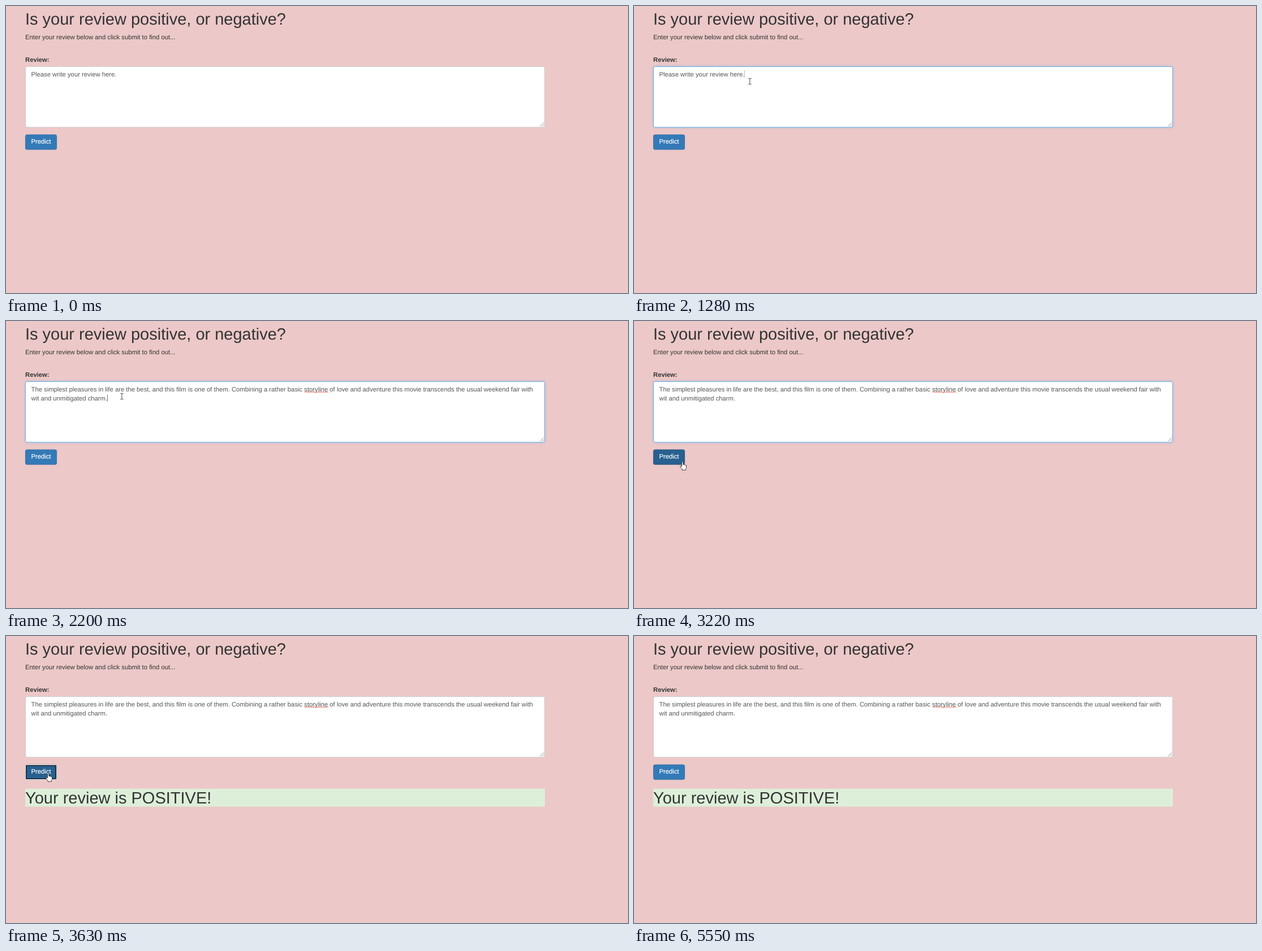
An HTML page for the animation above (5720 ms loop, 1100 px wide and 509 px high).

```html
<!DOCTYPE html>
<html lang="en">
<head>
<meta charset="utf-8">
<title>Review predictor</title>
<style>
  html, body { margin: 0; width: 100%; height: 100%; overflow: hidden; background: #ecc8c8; }
  svg { display: block; width: 1100px; height: 509px; }
  text {
    font: 11.285px "Liberation Sans", Arial, sans-serif;
    fill: #333;
    text-rendering: geometricPrecision;
  }
  .big { font-size: 29px; }
  .bold { font-weight: bold; }
  .field { fill: #555; }
  .light { fill: #fff; stroke: #fff; stroke-width: .2px; }
</style>
</head>
<body>
<svg viewBox="0 0 1100 509">
  <defs>
    <filter id="blur" x="-5%" y="-20%" width="110%" height="140%">
      <feGaussianBlur stdDeviation="2"/>
    </filter>
  </defs>

  <text class="big" x="34" y="33">Is your review positive, or negative?</text>
  <text x="34" y="58.8">Enter your review below and click submit to find out...</text>
  <text class="bold" x="34" y="98.7">Review:</text>

  <rect id="glow" x="34" y="107" width="919" height="108.4" rx="3.2" fill="#66afe9" filter="url(#blur)"/>
  <rect id="box" x="34.45" y="107.5" width="918.1" height="107.5" rx="2.9" fill="#fff"/>
  <path d="M944.6 213.4L951.2 206.8M948.4 213.4L951.2 210.6" stroke="#777" stroke-width=".8"/>

  <rect id="selection" x="44.5" y="114.2" width="151" height="12.8" fill="#3390ff"/>
  <text id="hint" class="field" x="44.5" y="124.5">Please write your review here.</text>
  <g id="review">
    <text class="field" x="44.5" y="124.5">The simplest pleasures in life are the best, and this film is one of them. Combining a rather basic storyline of love and adventure this movie transcends the usual weekend fair with</text>
    <text class="field" x="44.5" y="140.6">wit and unmitigated charm.</text>
    <path id="squiggle" fill="none" stroke="#e0452f" stroke-width=".9"/>
  </g>
  <rect id="caret" width=".8" height="12.6" fill="#555"/>

  <rect id="button" x="34.4" y="228.2" width="55.2" height="26.4" rx="2.9" stroke-width=".8"/>
  <g id="ring" fill="none">
    <rect x="34.5" y="228.5" width="54.8" height="26" rx="2.6" stroke="#fff"/>
    <rect x="35.6" y="229.6" width="52.6" height="23.8" rx="1.8" stroke="#101010" stroke-width="1.3"/>
  </g>
  <text class="light" x="44.4" y="244.4">Predict</text>

  <g id="result">
    <rect x="34" y="270.8" width="919" height="31.8" fill="#ddefd9"/>
    <text class="big" x="34" y="296.8">Your review is POSITIVE!</text>
  </g>

  <g id="pointer" stroke-width=".8" stroke-linejoin="round">
    <path id="arrow" fill="#fff" stroke="#111" d="M0 0V13.2L3 10.4 5 15 7 14.1 5 9.7H9.2Z"/>
    <path id="beam" fill="none" stroke="#333" stroke-width=".9"
      d="M-2.7 -5.2H-.7L0 -4.6 .7 -5.2H2.7M0 -4.6V4.6M-2.7 5.2H-.7L0 4.6 .7 5.2H2.7"/>
    <path id="hand" fill="#fff" stroke="#111"
      d="M-1.2 1Q0 -.6 1.2 1V5.6Q2.4 4.6 3.4 6 4.6 5.3 5.4 6.6 6.8 6.2 6.9 7.8V10.5Q6.8 12 5.6 13.4V15.2H-.6V13.4Q-2.6 11.4 -4 9 -4.4 7.2 -2.7 7.6L-1.2 9Z"/>
  </g>
</svg>
<script>
  const LOOP = 5720;
  const STEP = 76; // the screen refreshes the pointer at this pace
  const CLICK = 1130, SELECT = 1670, CLEAR = 1750, PASTE = 2200;
  const HOVER = 3220, PRESS = 3450, DONE = 3630, GONE = 4785, BLUR = 5550;

  const $ = id => document.getElementById(id);
  const show = (id, on) => { $(id).style.display = on ? '' : 'none'; };
  const set = (id, attrs) => {
    for (const name in attrs) $(id).setAttribute(name, attrs[name]);
  };
  const clamp = v => Math.max(0, Math.min(1, v));

  // Each pointer move is one cubic curve.
  const moves = [
    { at: 290, steps: 7, curve: [[304, 459], [112, 230], [140, 26], [221, 114]] },
    { at: 900, steps: 1, curve: Array(4).fill([204.9, 133.6]) },
    { at: 2600, steps: 7, curve: [[207, 135], [330, 150], [230, 250], [96, 245]] },
    { at: HOVER, steps: 2, curve: [[85.7, 249.2], [82, 247], [78, 245], [74.6, 243]] },
    { at: 4240, steps: 6, curve: [[92, 232], [150, 100], [420, 150], [581, 500]] }
  ];

  function pointerAt(t) {
    const move = moves.filter(m => t >= m.at).pop();
    if (!move || t >= GONE) return null;
    const k = clamp(Math.floor((t - move.at) / STEP) / move.steps), j = 1 - k;
    const [a, b, c, d] = move.curve;
    return [0, 1].map(i => j ** 3 * a[i] + 3 * j * j * k * b[i] + 3 * j * k * k * c[i] + k ** 3 * d[i]);
  }

  function pointerKind([x, y]) {
    if (x > 34 && x < 90 && y > 227 && y < 255) return 'hand';
    return x > 34 && x < 953 && y > 107 && y < 215 ? 'beam' : 'arrow';
  }

  function drawCaret(t) {
    const typed = [CLICK, CLEAR, PASTE].filter(at => t >= at).pop();
    const lit = (t - typed) % 1060 < 530;
    show('caret', lit && t < PRESS && !(t >= SELECT && t < CLEAR));
    set('caret', {
      x: t < SELECT ? 195.2 : t < PASTE ? 44.5 : 179,
      y: t < PASTE ? 114.3 : 130.4,
      opacity: t < SELECT ? .5 : 1
    });
  }

  function draw(t) {
    const focus = clamp((t - CLICK) / 150) - clamp((t - PRESS) / 150);
    set('glow', { opacity: .5 * focus });
    set('box', { stroke: `rgb(${204 - 102 * focus},${204 - 29 * focus},${204 + 29 * focus})` });

    const selected = t >= SELECT && t < CLEAR;
    show('selection', selected);
    show('hint', t < CLEAR);
    $('hint').style.fill = selected ? '#fff' : '';
    show('review', t >= PASTE);
    drawCaret(t);

    const dark = t >= HOVER && t < BLUR;
    set('button', { fill: dark ? '#286090' : '#337ab7', stroke: dark ? '#204d74' : '#2e6da4' });
    show('ring', t >= PRESS && t < BLUR);
    show('result', t >= DONE);

    const spot = pointerAt(t);
    show('pointer', spot);
    if (!spot) return;
    set('pointer', { transform: `translate(${spot})` });
    const kind = pointerKind(spot);
    for (const id of ['arrow', 'beam', 'hand']) show(id, id === kind);
  }

  let wave = 'M528 126.8';
  for (let i = 1; i <= 26; i++) wave += `l1.61 ${i % 2 ? -1.3 : 1.3}`;
  set('squiggle', { d: wave });

  const begin = performance.now();
  function tick() {
    draw((performance.now() - begin) % LOOP);
    requestAnimationFrame(tick);
  }
  tick();
</script>
</body>
</html>
```
